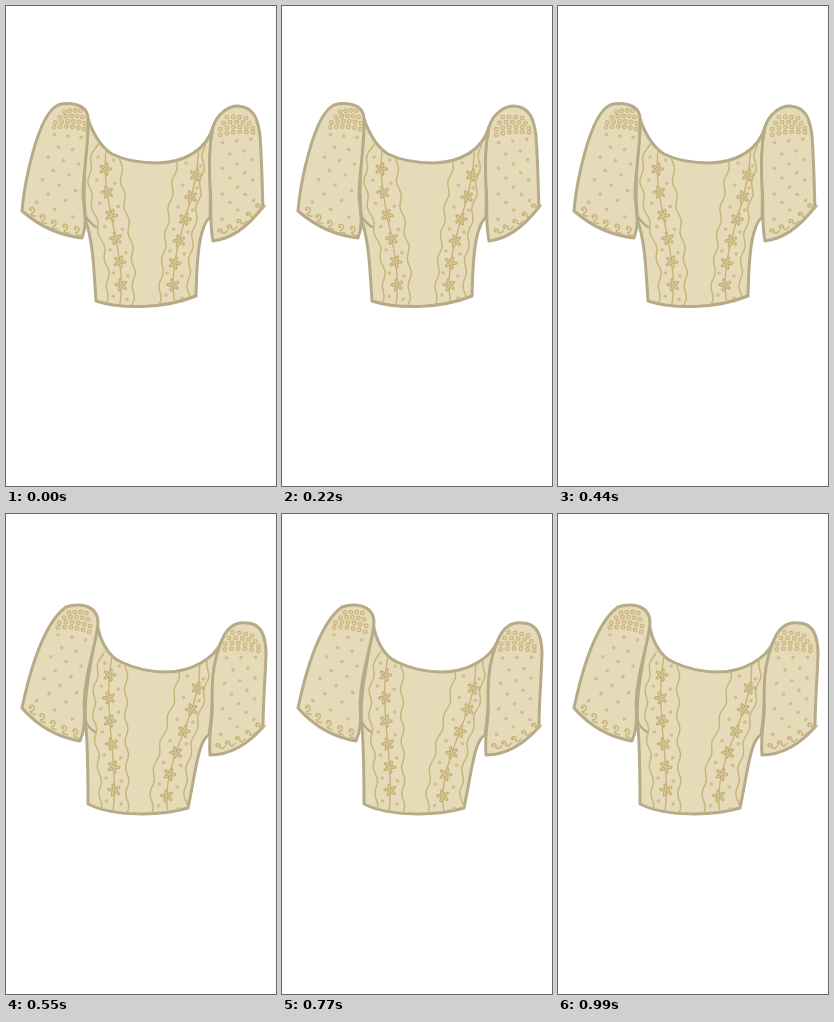
An HTML page for the animation above (1100 ms loop, 270 by 480 pixels).

```html
<!DOCTYPE html>
<html lang="en">
<head>
<meta charset="utf-8">
<title>Blouse</title>
<style>
html, body { margin: 0; width: 100%; height: 100%; overflow: hidden; background: #fff; }
svg { display: block; width: 100%; height: 100%; }
.cloth { fill: #e6dbb8; stroke: #b7aa88; stroke-width: 3; stroke-linejoin: round; stroke-linecap: round; }
.hook { fill: none; stroke-width: 2.4; }
.line { fill: none; stroke: #c7b27a; stroke-width: 1.4; stroke-linecap: round; stroke-linejoin: round; }
.bloom { fill: #e0d2a6; stroke: #c2ad72; stroke-width: 1.2; stroke-linejoin: round; }
.dot { fill: #cfbd8c; }
.ring { fill: #dfd1a5; stroke: #c8b480; stroke-width: 1.1; }
</style>
</head>
<body>
<svg id="stage" viewBox="0 0 270 480"></svg>
<script>
const STEP = 110, TOP = 138, BOTTOM = 298;

// Panels: x of each line at four even heights, and the first and last flower's y.
// Sleeve quads: shoulder left and right, hem left and right.
const poses = [
  {
    body: 'M82 113C88 130 95 141 106 148C118 154 135 157 152 157C178 156 200 145 207 121C203 150 205 185 204 211C194 220 191 245 190 290C160 302 118 304 90 295C88 265 87 235 80 216C76 190 79 155 82 113Z',
    hook: 'M78 207Q82 216 90 221',
    panels: [
      { left: [91, 85, 98, 99], stem: [101, 102, 112, 114], right: [115, 118, 126, 126], blooms: [163, 279] },
      { left: [174, 165, 158, 153], stem: [192, 185, 171, 169], right: [198, 193, 185, 183], blooms: [169, 279] }
    ],
    sleeves: [
      { outline: 'M16 205C18 180 31 109 52 99C59 97 81 95 82 112C83 140 77 165 77 190C78 205 82 217 76 232C50 229 31 218 16 205Z',
        quad: [[46, 112], [84, 112], [16, 205], [76, 232]] },
      { outline: 'M207 121C211 108 222 100 232 100C248 101 252 113 254 130C256 155 256 180 257 201C243 219 226 233 207 235C203 215 206 200 204 180C203 155 203 142 207 121Z',
        quad: [[209, 118], [252, 118], [207, 235], [257, 201]] }
    ]
  },
  {
    body: 'M91 108C93 124 101 142 115 148C130 155 145 158 160 158C185 158 209 145 216 126C206 155 208 190 203 221C192 226 189 262 182 294C155 302 108 303 82 290C82 265 82 240 80 213C76 180 88 140 91 108Z',
    hook: 'M78 203Q81 213 89 218',
    panels: [
      { left: [97, 88, 92, 94], stem: [107, 103, 107, 107], right: [121, 120, 121, 121], blooms: [161, 276] },
      { left: [173, 166, 151, 146], stem: [192, 187, 168, 162], right: [202, 196, 183, 181], blooms: [174, 282] }
    ],
    sleeves: [
      { outline: 'M16 194C22 165 36 110 60 93C69 90 91 88 92 108C91 130 79 155 78 190C79 205 79 216 74 227C50 223 30 210 16 194Z',
        quad: [[50, 104], [90, 107], [16, 194], [74, 227]] },
      { outline: 'M216 126C221 113 230 108 239 109C255 108 260 122 260 140C259 170 257 190 257 213C242 230 225 241 204 241C202 215 208 205 206 185C206 160 208 145 216 126Z',
        quad: [[214, 124], [258, 129], [204, 241], [257, 213]] }
    ]
  }
];

const range = n => [...Array(n).keys()];
const mix = (a, b, t) => a + (b - a) * t;
const mixPoint = (p, q, t) => [mix(p[0], q[0], t), mix(p[1], q[1], t)];
const path = (d, cls, more = '') => `<path class="${cls}" d="${d}" ${more}/>`;
const circle = ([x, y], r, cls) => `<circle class="${cls}" cx="${x.toFixed(2)}" cy="${y.toFixed(2)}" r="${r}"/>`;
const polyline = points => 'M' + points.map(p => p.map(v => v.toFixed(2)).join(' ')).join('L');

// Cubic through four evenly spaced values
function lineX([a, b, c, d], y) {
  const t = 3 * (y - TOP) / (BOTTOM - TOP);
  return a + t * (b - a + (t - 1) / 2 * (c - 2 * b + a + (t - 2) / 3 * (d - 3 * c + 3 * b - a)));
}

function trail(xs, sway) {
  const ys = range(BOTTOM - TOP + 4).map(i => TOP + i);
  return path(polyline(ys.map(y => [lineX(xs, y) + sway * Math.sin(y * Math.PI / 13), y])), 'line');
}

function bloom(center, turn) {
  const [x, y] = center;
  const petals = range(40).map(i => {
    const a = i * Math.PI / 20, r = 4 + 2.4 * Math.cos(5 * a);
    return [x + r * Math.cos(a + turn), y + r * Math.sin(a + turn)];
  });
  return path(polyline(petals) + 'Z', 'bloom') + circle(center, 1, 'dot');
}

function panel({ left, stem, right, blooms: [first, last] }) {
  const gap = (last - first) / 5;
  let out = trail(left, 1.5) + trail(right, 1.5) + trail(stem, 0);
  for (let i = 0; i < 7; i++) {
    const y = first + i * gap;
    [left, right].forEach((edge, side) => {
      const dotY = y - 12 + side * 3;
      out += circle([mix(lineX(stem, dotY), lineX(edge, dotY), .55), dotY], 1.8, 'dot');
    });
    if (i < 6) out += bloom([lineX(stem, y), y], i * 1.9);
  }
  return out;
}

function sleeve({ outline, quad: [a, b, c, d] }, side) {
  const at = (u, v) => mixPoint(mixPoint(a, b, u), mixPoint(c, d, u), v);
  let out = path(outline, 'cloth');

  // arched rows of rings on the shoulder
  [4, 5, 6, 6].forEach((n, row) => range(n).forEach(i => {
    const u = .5 + (i - (n - 1) / 2) * .15;
    out += circle(at(u, -.07 + row * .05 + .12 * (u - .5) ** 2), 1.9, 'ring');
  }));

  // staggered dots: three, two, three...
  for (let row = 0; row < 7; row++) {
    const n = 3 - row % 2;
    for (let i = 0; i < n; i++)
      out += circle(at(.5 + (i - (n - 1) / 2) * .32, .17 + row * .115), 1.8, 'dot');
  }

  // scrolls along the hem
  const tilt = Math.atan2(d[1] - c[1], d[0] - c[0]) * 180 / Math.PI;
  const size = side ? .4 : .52;
  const scroll = polyline([...range(26).map(i => {
    const t = i * .3;
    return [size * t * Math.cos(t), size * t * Math.sin(t)];
  }), [3, 5], [7, 4]]);
  for (let i = 0; i < 5; i++) {
    const u = .13 + i * .19, [x, y] = at(u, .93 + .05 * Math.sin(u * Math.PI));
    out += path(scroll, 'line', `transform="translate(${x} ${y}) rotate(${tilt})"`);
  }
  return out;
}

const blouse = (p, i) => `<g><clipPath id="body${i}"><path d="${p.body}"/></clipPath>` +
  path(p.body, 'cloth') +
  `<g clip-path="url(#body${i})">${p.panels.map(panel).join('')}</g>` +
  p.sleeves.map(sleeve).join('') + path(p.hook, 'cloth hook') + '</g>';

const stage = document.getElementById('stage');
stage.innerHTML = poses.map(blouse).join('');
const views = [...stage.children];
const start = performance.now();

function tick() {
  const pose = Math.floor((performance.now() - start) / STEP) % 2;
  views.forEach((v, i) => v.setAttribute('visibility', i === pose ? 'visible' : 'hidden'));
  requestAnimationFrame(tick);
}
tick();
</script>
</body>
</html>
```
